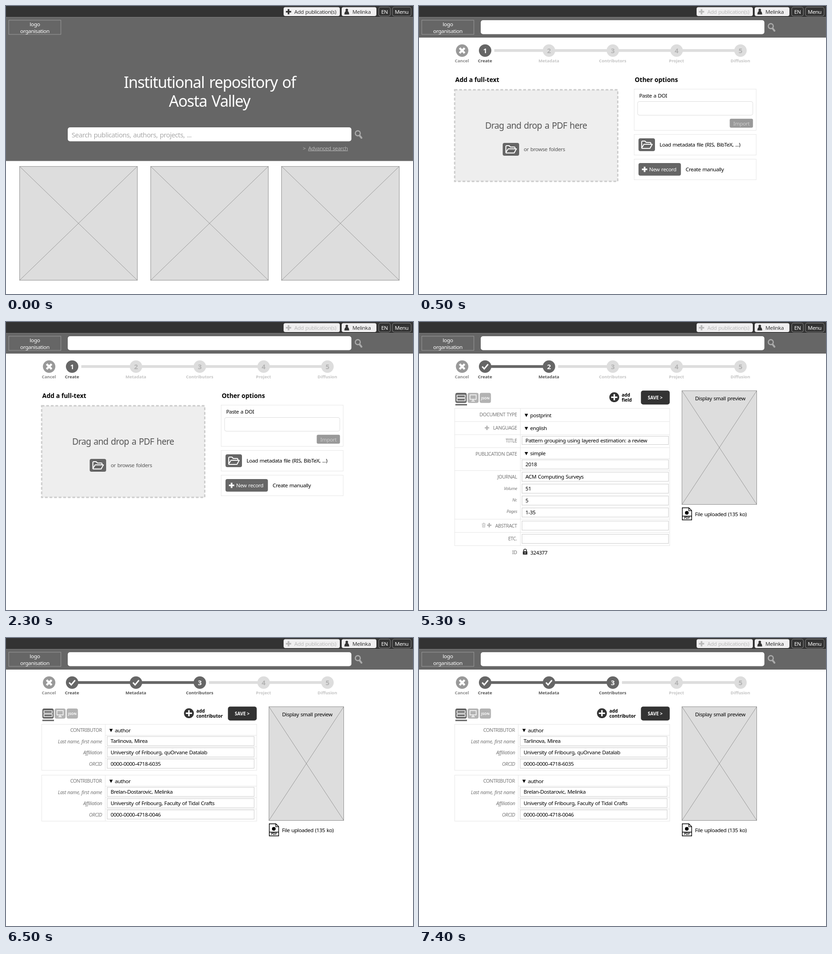
An HTML page for the animation above (8000 ms loop, 890 by 629 pixels).

```html
<!DOCTYPE html>
<html lang="en">
<head>
<meta charset="utf-8">
<style>
  html, body { margin: 0; width: 100%; height: 100%; overflow: hidden; background: #fff; }
  svg { display: block; width: 890px; height: 629px; }
  text { font-family: "Noto Sans", sans-serif; font-size: 11.6px; letter-spacing: -.036em; word-spacing: .08em; white-space: pre; }
  text.b { font-weight: 700; letter-spacing: 0; word-spacing: 0; }
  text.i { font-style: italic; }
</style>
</head>
<body>
<svg id="stage" viewBox="0 0 890 629"></svg>
<script>
const DARK = '#333', GREY = '#666', MID = '#999', SOFT = '#b3b3b3', PALE = '#ddd', RULE = '#e6e6e6';
const STARTS = [0, 500, 3500, 6500], LOOP = 8000;

// Drawing helpers, each returning SVG markup
const box = (x1, y1, x2, y2, fill, stroke = 'none', r = 0, extra = '') =>
  `<rect x="${x1}" y="${y1}" width="${x2 - x1}" height="${y2 - y1}" rx="${r}" fill="${fill}" stroke="${stroke}" ${extra}/>`;
const line = (d, stroke, width = 1, extra = '') =>
  `<path d="${d}" fill="none" stroke="${stroke}" stroke-width="${width}" ${extra}/>`;
const shape = (d, fill) => `<path d="${d}" fill="${fill}"/>`;
const dot = (x, y, r, fill) => `<circle cx="${x}" cy="${y}" r="${r}" fill="${fill}"/>`;
const text = (x, y, s, { size = 11.6, fill = '#000', anchor = 'start', cls = '', extra = '' } = {}) =>
  `<text x="${x}" y="${y}" fill="${fill}" text-anchor="${anchor}" class="${cls}" style="font-size:${size}px" ${extra}>${s.replace(/>/g, '&gt;')}</text>`;
const bold = (x, y, s, size, fill = '#000', anchor = 'start') => text(x, y, s, { size, fill, anchor, cls: 'b' });
const middle = (x, y, s, size, fill) => text(x, y, s, { size, fill, anchor: 'middle' });
const label = (x, y, s, size = 10.5, cls = '') => text(x, y, s, { size, cls, fill: '#777', anchor: 'end' });
const plus = (x, y, r, width, color) => line(`M${x - r} ${y}h${2 * r}M${x} ${y - r}v${2 * r}`, color, width);
const caret = (x, y, s) => shape(`M${x} ${y - 3}h7.4l-3.7 7z`, '#000') + text(x + 12, y + 4, s);

const crossed = (x1, y1, x2, y2) => box(x1, y1, x2, y2, PALE, '#777', 0, 'stroke-width=".8"') +
  line(`M${x1} ${y1}L${x2} ${y2}M${x2} ${y1}L${x1} ${y2}`, '#777', .7);

const field = (x1, y, x2, s = '', h = 20) =>
  box(x1, y, x2, y + h, '#fff', '#ccc') + text(x1 + 7.5, y + h / 2 + 4.3, s);

const folder = (x, y) => box(x, y, x + 36, y + 28, GREY, 'none', 4) +
  line(`M${x + 7} ${y + 21}v-13q0-2 2-2h5l3 3h8q2 0 2 2v2M${x + 7} ${y + 21}l5-8h18l-5 9h-16q-2 0-2-1z`, '#fff', 2, 'stroke-linejoin="round"');

function header(home) {
  const y = home ? 265 : 31, add = home ? DARK : '#bbb';
  return box(0, 0, 890, 24.5, DARK) + box(0, 24.5, 890, home ? 338.5 : 69, GREY) +
    box(607, 2.5, 730, 22, '#f0eff0', 'none', 4) + plus(617.8, 12.5, 5.8, 3.6, add) +
    text(630.5, 17, 'Add publication(s)', { fill: add }) +
    box(734, 2.5, 810, 22, '#f0eff0', 'none', 4) + dot(745.2, 8.8, 2.8, DARK) +
    shape('M740 18.5q0-6 3.4-7.5h3.6q3.4 1.5 3.4 7.5z', DARK) + text(757.5, 17, 'Melinka', { fill: DARK }) +
    box(815, 2.5, 840.5, 22, DARK, '#888', 4) + middle(827.7, 17, 'EN', 11.6, '#fff') +
    box(845, 2.5, 886, 22, DARK, '#888', 4) + middle(865.2, 17, 'Menu', 11.6, '#fff') +
    box(6, 31, 120, 62, 'none', '#aaa', 0, 'stroke-width=".8"') +
    middle(63, 44, 'logo', 11.6, '#fff') + middle(63, 58.5, 'organisation', 11.6, '#fff') +
    box(135, y, 755.3, y + 30.5, '#fff', 'none', 5) +
    `<circle cx="769.3" cy="${y + 13}" r="5.4" fill="none" stroke="#aaa" stroke-width="2.6"/>` +
    line(`M773.3 ${y + 18}l4 5`, '#aaa', 4, 'stroke-linecap="round"');
}

function steps(current) {
  const names = ['Create', 'Metadata', 'Contributors', 'Project', 'Diffusion'];
  const at = i => 144.6 + 139.6 * i, y = 97.3, here = at(current);
  let out = line(`M${here + 20} ${y}H703`, PALE, 6) + line(`M144.6 ${y}H${here}`, GREY, 6) +
    dot(94.3, y, 13.6, MID) + line('M88.8 91.8l11 11m0-11l-11 11', '#fff', 4.6) +
    bold(93.7, 123.2, 'Cancel', 9.4, '#888', 'middle');
  names.forEach((name, i) => {
    const x = at(i), ahead = i > current;
    out += dot(x, y, 13.6, ahead ? PALE : GREY) +
      (i < current ? line(`M${x - 6.5} ${y}l4.6 5l8.4-10`, '#fff', 3)
        : bold(x, y + 5.4, String(i + 1), 15, ahead ? SOFT : '#fff', 'middle')) +
      bold(x - .3, 123.2, name, 9.4, ahead ? '#c4c4c4' : '#555', 'middle');
  });
  return out;
}

function toolbar(y, plusX, noun) {
  return box(79.5, y, 104.3, y + 22, GREY, 'none', 4) +
    line(`M83 ${y + 5}h18v5h-18zM83 ${y + 12.5}h18v5h-18z`, '#fff', 1.6) +
    line(`M79.5 ${y + 26}h25.5`, GREY, 3) +
    box(106.3, y, 130.3, y + 22, SOFT, 'none', 4) +
    line(`M111.5 ${y + 4.5}h13.5v9.5h-13.5zM118.2 ${y + 14}v3.5M114.5 ${y + 18}h7.5`, '#fff', 1.4) +
    box(132.7, y, 157.3, y + 22, SOFT, 'none', 4) + bold(145, y + 13.8, 'JSON', 7.4, '#fff', 'middle') +
    dot(plusX, 164.3, 10.8, DARK) + plus(plusX, 164.3, 6.8, 3.2, '#fff') +
    bold(plusX + 16.2, 162.8, 'add', 10) + bold(plusX + 16.2, 174, noun, 10) +
    box(485.3, 149.8, 548.3, 180.2, DARK, 'none', 5) + bold(516.5, 168.8, 'SAVE >', 10, '#fff', 'middle');
}

const preview = () => crossed(575, 150, 738.6, 398.5) + middle(658.7, 170.7, 'Display small preview') +
  line('M575.7 405.8h14.3l6.3 6.3v20.2h-20.6zM590 405.8v6.3h6.3M575.7 424h20.6', '#000', 1.4) +
  dot(585.6, 416.8, 4, '#000') + bold(586, 430.4, 'PDF', 6.6, '#000', 'middle') +
  text(603.5, 424, 'File uploaded (135 ko)');

function home() {
  return header(true) +
    middle(445.5, 178.5, 'Institutional repository of', 33.7, '#fff') +
    middle(445, 219.5, 'Aosta Valley', 33.7, '#fff') +
    text(143.5, 286.5, 'Search publications, authors, projects, ...', { size: 14.8, fill: '#aaa' }) +
    text(649, 314.7, '>', { fill: '#b5b5b5' }) +
    text(660.7, 314.7, 'Advanced search', { fill: '#b5b5b5', extra: 'text-decoration="underline"' }) +
    [29.8, 316.3, 602.6].map(x => crossed(x, 350.3, x + 257.4, 599)).join('');
}

function create() {
  return header() + steps(0) + bold(79.3, 166.2, 'Add a full-text', 13.6) + bold(471.7, 166.2, 'Other options', 13.6) +
    box(78, 183, 434.6, 383, '#eee', '#ccc', 0, 'stroke-width="3" stroke-dasharray="6 4"') +
    middle(256, 267.5, 'Drag and drop a PDF here', 19, '#555') +
    folder(183, 299) + text(229, 316.7, 'or browse folders', { fill: '#555' }) +
    [[181.5, 271.5], [280.5, 325.5], [334.5, 379.5]].map(([a, b]) => box(470.5, a, 737.3, b, '#fff', RULE)).join('') +
    text(481.5, 200, 'Paste a DOI') + box(478, 208.5, 730, 238.5, '#fff', PALE, 4) +
    box(679.5, 246.3, 730.3, 265.7, MID, 'none', 3) + middle(705, 260.7, 'Import', 11.6, '#ccc') +
    folder(480, 289) + text(526, 306.5, 'Load metadata file (RIS, BibTeX, ...)') +
    box(480, 343, 572.7, 370.5, GREY, 'none', 4) + plus(493.3, 356.8, 5.8, 3.6, '#fff') +
    text(503.3, 361.2, 'New record', { fill: '#fff' }) + text(583, 360.5, 'Create manually');
}

function metadata() {
  const labels = [[206.3, 'DOCUMENT TYPE'], [235.2, 'LANGUAGE'], [263.4, 'TITLE'], [292, 'PUBLICATION DATE'],
    [342.3, 'JOURNAL'], [448.5, 'ABSTRACT'], [477.3, 'ETC.'], [506.5, 'ID']];
  const fine = [[367.3, 'Volume'], [392.3, 'Nr.'], [417.3, 'Pages']];
  const fields = [[301, '2018'], [328, 'ACM Computing Surveys'], [354, '51'], [380, '5'], [406, '1-35'], [434.7], [463.6]];
  return header() + steps(1) + toolbar(154.7, 427, 'field') + preview() +
    box(78, 188.5, 548.2, 488.4, '#fff', RULE) +
    line('M221.7 188.5V488.4' + [217.4, 246, 274.4, 324.5, 430.7, 459.5].map(y => `M78 ${y}H548.2`).join('') + 'M221.7 298.5H548.2', RULE) +
    labels.map(([y, s]) => label(214.3, y, s)).join('') +
    fine.map(([y, s]) => label(214.6, y, s, 9.4, 'i')).join('') +
    caret(231, 203.5, 'postprint') + caret(231, 232.2, 'english') + caret(231, 287, 'simple') +
    field(225.3, 249.5, 545.6, 'Pattern grouping using layered estimation: a review', 18) +
    fields.map(([y, s]) => field(225.3, y, 545.6, s)).join('') +
    plus(148.6, 231.2, 4.8, 2.8, SOFT) + plus(153.6, 443.8, 4.8, 2.8, SOFT) +
    line('M137.4 441h8.2M140 440.6v-1.4h3v1.4M138.4 441.5l.5 6.8h5.2l.5-6.8M140.5 442.5v4.5M142.5 442.5v4.5', SOFT, .9) +
    box(227, 500.8, 237, 508, DARK, 'none', 1) + line('M229 501v-2a3 3 0 0 1 6 0v2', DARK, 1.7) + dot(232, 504.3, 1.1, '#fff') +
    text(243.5, 507.7, '324377');
}

function contributor(y, name, place, orcid) {
  return box(78, y, 548.2, y + 100.5, '#fff', RULE) +
    line(`M217 ${y}v100.5` + [24, 49, 74].map(d => `M217 ${y + d}H548.2`).join(''), RULE) +
    label(209.7, y + 16.5, 'CONTRIBUTOR') + caret(226, y + 13, 'author') +
    [['Last name, first name', name], ['Affiliation', place], ['ORCID', orcid]].map(([key, value], i) =>
      label(210, y + 41 + 24.9 * i, key, 10.6, 'i') + field(221.3, y + 26.6 + 24.7 * i, 542.6, value)).join('');
}

function contributors() {
  return header() + steps(2) + toolbar(154, 400, 'contributor') + preview() +
    contributor(188.5, 'Tarlinova, Mirea', 'University of Fribourg, quOrvane Datalab', '0000-0000-4718-6035') +
    contributor(299.5, 'Brelan-Dostarovic, Melinka', 'University of Fribourg, Faculty of Tidal Crafts', '0000-0000-4718-0046');
}

const stage = document.getElementById('stage');
stage.innerHTML = [home, create, metadata, contributors].map(draw => `<g>${draw()}</g>`).join('');
const screens = [...stage.children];

function tick() {
  const time = performance.now() % LOOP;
  const active = STARTS.filter(start => start <= time).length - 1;
  screens.forEach((screen, i) => { screen.style.display = i === active ? '' : 'none'; });
  requestAnimationFrame(tick);
}
tick();
</script>
</body>
</html>
```
